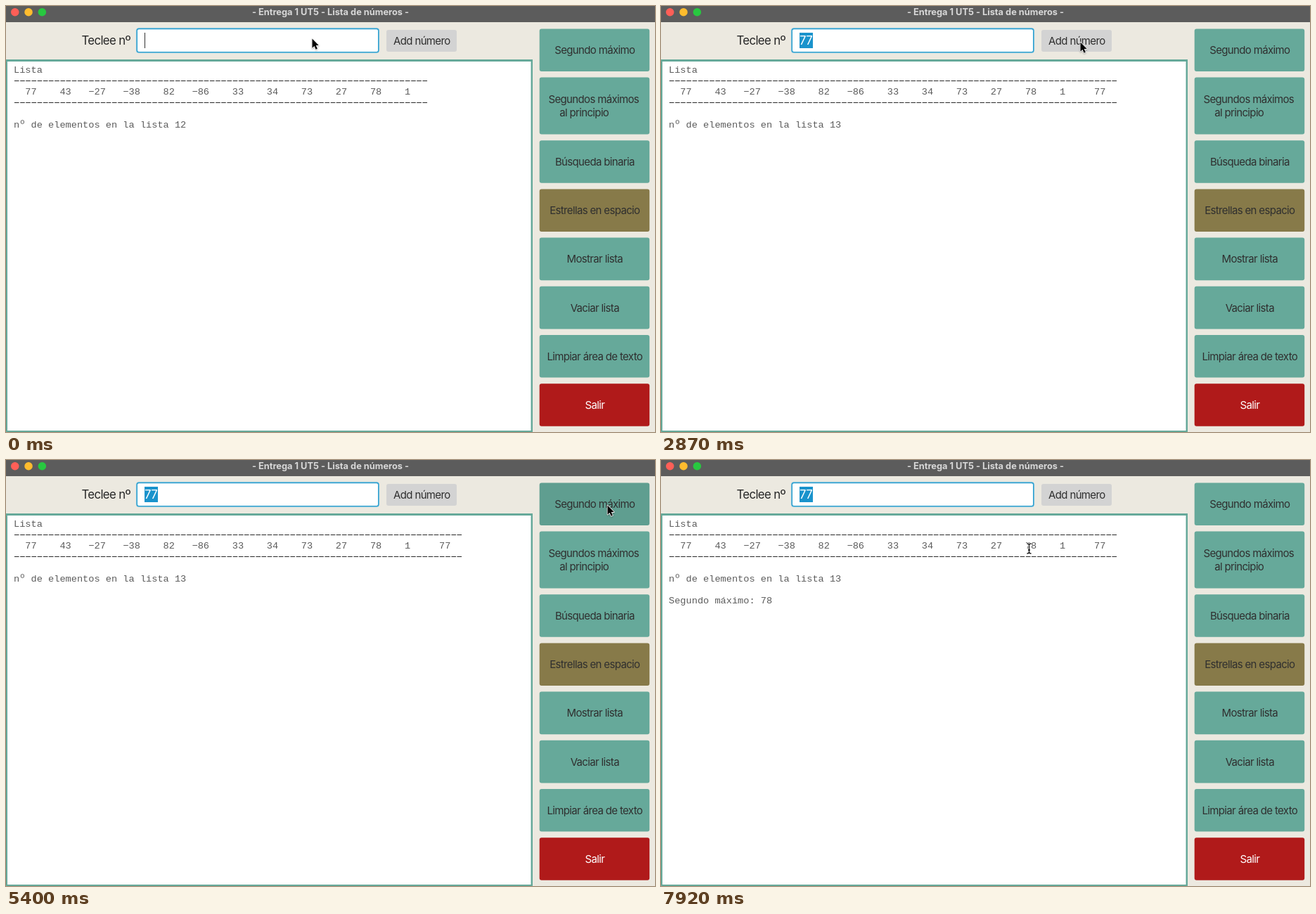
Animation, 923 px wide and 606 px high, one loop 8 s. Source, as an HTML page with a canvas:

```html
<!DOCTYPE html>
<html lang="es">
<head>
<meta charset="utf-8">
<style>
html, body { margin: 0; width: 100%; height: 100%; overflow: hidden; background: #ece9e0; }
canvas { display: block; }
</style>
</head>
<body>
<canvas id="stage" width="923" height="606"></canvas>
<script>
const ctx = document.getElementById('stage').getContext('2d');
const LOOP = 8000, TICK = 147.5;
const SANS = 'Inter, "Open Sans", sans-serif';
const MONO = '13.63px "Liberation Mono", monospace';
const TEAL = '#66a99a', INK = '#2f2f2f';
const NUMBERS = [77, 43, -27, -38, 82, -86, 33, 34, 73, 27, 78, 1];

const BUTTONS = [
  ['Segundo máximo'],
  ['Segundos máximos', 'al principio  '],
  ['Búsqueda binaria'],
  ['Estrellas en espacio'],
  ['Mostrar lista'],
  ['Vaciar lista'],
  ['Limpiar área de texto'],
  ['Salir']
];
const FILLS = { Salir: '#b01a1a', 'Estrellas en espacio': '#877a49' };

// The pointer follows curves that bend past their goals
const REST = { x: 435.5, y: 46.5 };
const MOVES = [
  { start: 2130, ticks: 6, via: { x: 770, y: 50 }, to: { x: 596.5, y: 51.5 } },
  { start: 3620, ticks: 9, via: { x: 770, y: 278 }, to: { x: 855.5, y: 64.5 } },
  { start: 6890, ticks: 8, via: { x: 240, y: 170 }, to: { x: 523.5, y: 126 } }
];

function box(x, y, w, h, r, fill) {
  ctx.fillStyle = fill;
  ctx.beginPath();
  ctx.roundRect(x, y, w, h, r);
  ctx.fill();
}

function text(str, x, y, font, fill, align = 'left', spacing = 0) {
  ctx.font = font;
  ctx.letterSpacing = spacing + 'px';
  ctx.textAlign = align;
  ctx.fillStyle = fill;
  ctx.fillText(str, x, y);
}

const label = (str, x, y, fill = INK) => text(str, x, y, `15px ${SANS}`, fill, 'center', -0.65);
const large = (str, x, fill = '#262626') => text(str, x, 55, `16.8px ${SANS}`, fill, 'left', -0.65);
const mono = (str, row, fill = '#5c5c5c') => text(str, 11, Math.round(95 + row * 15.6), MONO, fill);

function drawWindow(t) {
  box(0, 0, 923, 606, 0, '#ece9e0');
  box(0, 0, 923, 23, 0, '#5c5c5c');
  ['#ff5f57', '#febc2e', '#28c840'].forEach((c, i) => box(7 + i * 19.3, 3, 11.5, 11.5, 6, c));
  text('- Entrega 1 UT5 - Lista de números -', 461.5, 13, `700 12.8px ${SANS}`, '#d8d8d8', 'center');

  large('Teclee nº', 107.5);
  box(541, 34, 100, 31, 3, '#d3d3d3');
  label('Add número', 591.3, 55);

  let y = 32.4;
  for (const lines of BUTTONS) {
    const name = lines[0];
    const h = 40.2 + 20.4 * lines.length;
    const pressed = name === 'Segundo máximo' && t >= 5400 && t < 5550;
    box(758.7, y, 156.5, h, 3, pressed ? '#5f9e90' : FILLS[name] || TEAL);
    lines.forEach((line, i) => {
      const indent = lines.length > 1 ? 1.5 + i * 10 : 0;
      label(line, 837.3 - indent, y + h / 2 + 5.5 + (i - (lines.length - 1) / 2) * 19.5,
        name === 'Salir' ? '#fff' : INK);
    });
    y += h + 8.6;
  }
}

function drawField(t) {
  box(184.5, 30.8, 347, 36.7, 4.5, '#cfe1e3');
  box(185.4, 31.6, 345.2, 35, 3.5, '#2b9fd0');
  box(187, 33.2, 342, 31.8, 2, '#fff');

  const typed = t < 1530 ? '' : t < 1680 ? '7' : '77';
  const selected = t >= 2870;
  if (selected) box(197, 38, 19, 22, 0, '#1a93cc');
  large(typed, 197, selected ? '#fff' : INK);

  const hidden = (t >= 480 && t < 1080) || (t >= 2280 && t < 2720);
  if (!selected && !hidden) box(197 + typed.length * 9.5, 38, 1, 22, 0, '#333');
}

function drawList(t) {
  box(0, 76, 749, 530, 0, TEAL);
  box(2, 79, 744.5, 525, 0, '#fff');
  const list = t < 2870 ? NUMBERS : [...NUMBERS, 77];
  const cell = n => {
    const s = String(n).replace('-', '−');
    return (' '.repeat((6 - s.length) / 2) + s).padEnd(6);
  };
  const rule = '−'.repeat(list.length * 6);
  mono('Lista', 0);
  mono(rule, 1, '#222');
  mono(list.map(cell).join(''), 2);
  mono(rule, 3, '#222');
  mono('nº de elementos en la lista ' + list.length, 5);
  if (t >= 5550) mono('Segundo máximo: 78', 7);
}

function pointerAt(t) {
  let at = REST;
  for (const { start, ticks, via, to } of MOVES) {
    if (t < start) break;
    const tick = Math.min(ticks, Math.floor((t - start + 5) / TICK) + 1);
    const v = (1 - tick / ticks) ** 2, u = 1 - v, from = at;
    const bend = k => v * v * from[k] + 2 * u * v * via[k] + u * u * to[k];
    at = { x: bend('x'), y: bend('y') };
  }
  return at;
}

const ARROW = new Path2D('M0 0V13.2L3 10.4L5.1 15.3L7.4 14.3L5.3 9.6H9.3Z');
const BEAM = new Path2D('M-3 -7Q0 -7 0 -5V5Q0 7 -3 7M3 -7Q0 -7 0 -5M0 5Q0 7 3 7M-1.5 2H1.5');

function drawPointer(t) {
  const { x, y } = pointerAt(t);
  ctx.save();
  ctx.translate(x, y);
  ctx.lineJoin = 'round';
  ctx.strokeStyle = '#fff';
  if (x < 747 && y > 79) {
    ctx.lineWidth = 3.5;
    ctx.stroke(BEAM);
    ctx.strokeStyle = '#111';
    ctx.lineWidth = 1.3;
    ctx.stroke(BEAM);
  } else {
    ctx.shadowColor = 'rgba(0,0,0,.3)';
    ctx.shadowBlur = 2;
    ctx.shadowOffsetY = 1;
    ctx.lineWidth = 1.6;
    ctx.stroke(ARROW);
    ctx.shadowColor = 'transparent';
    ctx.fillStyle = '#000';
    ctx.fill(ARROW);
  }
  ctx.restore();
}

function frame(now) {
  const t = now % LOOP;
  drawWindow(t);
  drawField(t);
  drawList(t);
  drawPointer(t);
  requestAnimationFrame(frame);
}
frame(0);
</script>
</body>
</html>
```
